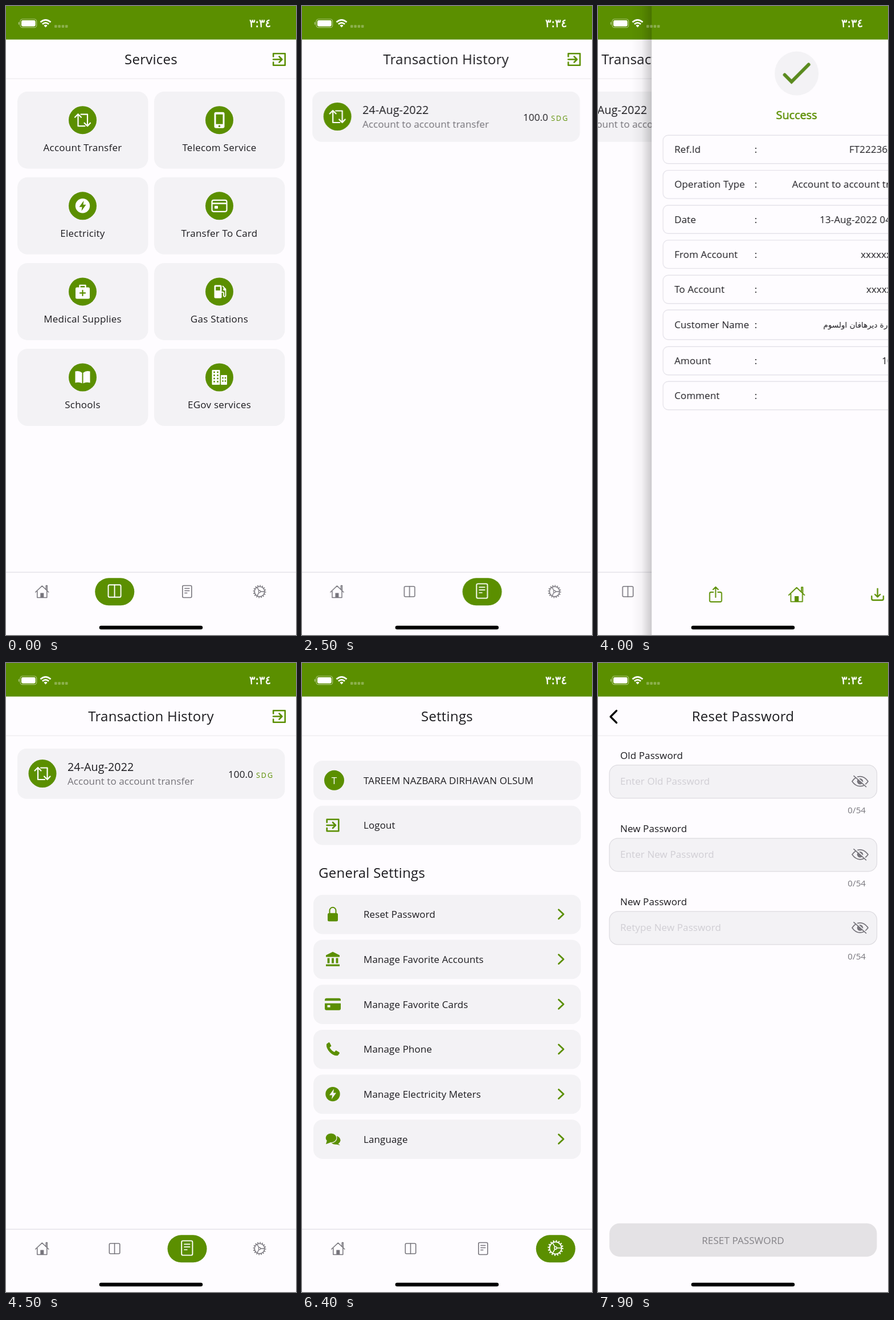
These frames come from a looping animation (509x1101 px, 8 s). An HTML page:

```html
<!DOCTYPE html>
<html lang="en">
<head>
<meta charset="utf-8">
<title>Mobile banking</title>
<style>
  html, body { margin: 0; width: 100%; height: 100%; overflow: hidden; background: #fefcff; }
  svg { display: block; width: 100%; height: 100%; }
  text { font-family: "Open Sans", "Noto Sans", "DejaVu Sans", sans-serif; font-size: 17px; letter-spacing: .1px; fill: #1c1b1f; }
  .title { font-size: 24px; letter-spacing: .26px; }
  .label { letter-spacing: .25px; }
  .date { font-size: 19.6px; letter-spacing: .12px; }
  .sub { fill: #747278; }
  .unit { font-size: 12.5px; letter-spacing: 2px; fill: #5b8f00; }
  .ok { font-size: 19.6px; fill: #5b8f00; stroke: #5b8f00; stroke-width: .6px; }
  .arabic { font-family: "DejaVu Sans", sans-serif; font-size: 13.5px; letter-spacing: 0; }
  .clock { font: 19.5px "DejaVu Sans", sans-serif; letter-spacing: 0; fill: #fff; stroke: #fff; stroke-width: .6px; }
  .hint { fill: #d0ced4; }
  .count { font-size: 15px; fill: #77757c; }
  .off { fill: #838186; }
  .white { color: #fff; fill: #fff; }
  .green { color: #5b8f00; }
  .gray { color: #77757c; }
  .line { fill: none; stroke: currentColor; stroke-linecap: round; stroke-linejoin: round; }

  #home, #history, #settings, #receipt, #reset { animation: 8s linear infinite; }
  #home { animation-name: home; }
  #history { animation-name: history; }
  #settings { animation-name: settings; }
  #receipt { animation-name: receipt; }
  #reset { animation-name: reset; }

  @keyframes history { 0%, 16.875% { opacity: 0; } 20%, 100% { opacity: 1; } }
  @keyframes settings { 0%, 70.625% { opacity: 0; } 76%, 100% { opacity: 1; } }
  @keyframes receipt {
    0%, 31.125% { transform: translateX(545px); animation-timing-function: cubic-bezier(.4, .3, .1, 1); }
    41%, 48.125% { transform: none; animation-timing-function: cubic-bezier(.5, .025, .1, 1); }
    55.875%, 100% { transform: translateX(545px); }
  }
  @keyframes reset {
    0%, 95.5% { transform: translateX(545px); animation-timing-function: cubic-bezier(.3, .6, .2, 1); }
    98.625%, 100% { transform: none; }
  }
  @keyframes home {
    0%, 31.125% { transform: none; animation-timing-function: cubic-bezier(.4, .3, .1, 1); }
    41%, 48.125% { transform: translateX(-167px); animation-timing-function: cubic-bezier(.5, .025, .1, 1); }
    55.875%, 95.5% { transform: none; animation-timing-function: cubic-bezier(.3, .6, .2, 1); }
    98.625%, 100% { transform: translateX(-167px); }
  }
</style>
</head>
<body>
<svg id="stage" viewBox="0 0 509 1101" preserveAspectRatio="none"></svg>
<script>
const GREEN = '#5b8f00', CARD = '#f3f2f5', EDGE = '#e5e3ea';

const text = (x, y, s, cls = '', anchor = 'start') =>
  `<text x="${x}" y="${y}" class="${cls}" text-anchor="${anchor}">${s}</text>`;
const rect = (x, y, w, h, r, fill, extra = '') =>
  `<rect x="${x}" y="${y}" width="${w}" height="${h}" rx="${r}" fill="${fill}" ${extra}/>`;
const circle = (x, y, r, fill = 'currentColor') => `<circle cx="${x}" cy="${y}" r="${r}" fill="${fill}"/>`;
const line = (d, w = 2) => `<path class="line" stroke-width="${w}" d="${d}"/>`;
const solid = (d, fill = 'currentColor') => `<path fill="${fill}" fill-rule="evenodd" d="${d}"/>`;
const at = (x, y, cls, body, scale = 1) =>
  `<g class="${cls}" transform="translate(${x} ${y}) scale(${scale})">${body}</g>`;
const cur = 'currentColor';
const bolt = 'M2-9L-6 2H-1L-2 9L6-2H1Z';

// Every icon is drawn around its own centre.
const icon = {
  swap: line('M-13.5-5L-8-10.5L-2.5-5M-8-10V10.5H4M-3-10H8.5V10.5M13.5 5L8.5 10.5L3 5', 2.2),
  phone: rect(-9, -14, 18, 28, 3, cur) + rect(-6, -10, 12, 17, 0, GREEN) + circle(0, 10.5, 1.7, GREEN),
  power: circle(0, 0, 12.7) + solid(bolt, GREEN),
  card: rect(-13, -10, 26, 20, 3, 'none', 'stroke="currentColor" stroke-width="2.2"') +
    rect(-13, -5.5, 26, 2.6, 0, cur) + rect(-8.5, 0, 6, 5, 1, cur),
  medical: rect(-12.5, -7.5, 25, 20, 2.5, cur) + line('M-5-8V-11H5V-8', 2.4) +
    `<g color="${GREEN}">${line('M0-2V7M-4.5 2.5H4.5', 2.2)}</g>`,
  gas: rect(-9, -11.5, 13, 23, 2, cur) + rect(-6.3, -8.5, 7.6, 6.5, 0, GREEN) +
    line('M4 1H6Q7.5 1 7.5 3V7.5Q9.5 10.5 11 7V-4L6-9.5', 1.8) + circle(9, -4, 2.4),
  book: solid('M-1-8Q-6-12.5-13-10.5V9.5Q-6 7.5-1 10.5ZM1-8Q6-12.5 13-10.5V9.5Q6 7.5 1 10.5Z'),
  city: rect(-13, -13, 14, 26, 1, cur) + rect(2.5, -4, 11, 17, 1, cur) +
    [-9, -3].map(x => [-9, -3.5, 2, 7.5].map(y => rect(x - 1.3, y - 1.3, 2.6, 2.6, 0, GREEN)).join('')).join('') +
    [6, 10.5].map(x => [1, 6.5].map(y => rect(x - 1.2, y - 1.2, 2.4, 2.4, 0, GREEN)).join('')).join(''),
  exit: line('M-10.3-5V-10.3H10.3V10.3H-10.3V5', 2.6) + line('M-10.5 0H4.5M0-5L5 0L0 5', 2.6),
  house: line('M-11.5 1L0-10L11.5 1M-8.5-1V10.5H8.5V-1M7-4V-10.5H9V-2.5', 1.5) + rect(-3, 2.5, 6, 8, 0, cur),
  columns: rect(-9.2, -9, 18.4, 18, 2, 'none', 'stroke="currentColor" stroke-width="1.6"') + line('M0-9V9', 1.6),
  sheet: rect(-8, -10.5, 16, 21, 2, 'none', 'stroke="currentColor" stroke-width="1.6"') +
    line('M-4-5.5H4M-4-1.5H4M-4 2.5H0', 1.4),
  gear: '<circle r="10.4" fill="none" stroke="currentColor" stroke-width="2" stroke-dasharray="1.7 2.384"/>' +
    '<circle r="8.8" fill="none" stroke="currentColor" stroke-width="1.5"/>' +
    line('M1.8 0H8.5M-1-1.7L-4.3-7.4M-1 1.7L-4.3 7.4', 1.3) +
    '<circle r="1.8" fill="none" stroke="currentColor" stroke-width="1.2"/>',
  share: line('M-4-4H-8Q-10.5-4-10.5-1.5V10.5Q-10.5 13-8 13H8Q10.5 13 10.5 10.5V-1.5Q10.5-4 8-4H4M0 5V-13M-4.5-8.5L0-13L4.5-8.5', 1.9),
  save: line('M-10.3 3V7.5Q-10.3 10-7.8 10H7.8Q10.3 10 10.3 7.5V3M0-10V4M-4.5 0L0 4.5L4.5 0', 2.3),
  lock: rect(-9, -2, 18, 14.5, 2.5, cur) + line('M-5.5-2V-6.5A5.5 5.5 0 0 1 5.5-6.5V-2', 2),
  bank: solid('M0-13L12-7V-4H-12V-7Z') + [-7.5, 0, 7.5].map(x => rect(x - 1.9, -2, 3.8, 9, 0, cur)).join('') +
    rect(-12, 9, 24, 3.2, 0, cur),
  fullCard: rect(-14, -10.5, 28, 21, 3, cur) + rect(-14, -6, 28, 4.5, 0, CARD) + rect(-9.5, 1.5, 5, 4, 0, CARD),
  call: solid('M-11-9L-7-12L-5.5-11.5L-2.5-5.5L-5.5-3Q-3 2 3 5L5.5 2L11.5 5.5L12 7L9 11Q2 12.5-5 5.5Q-12-2-11-9Z'),
  meter: circle(0, 0, 12.7) + solid(bolt, CARD),
  chat: '<ellipse cx="4.5" cy="2" rx="9" ry="7.5" fill="currentColor"/>' + solid('M8 7L13 11L5 9Z') +
    `<ellipse cx="-3" cy="-2" rx="10" ry="8.5" fill="currentColor" stroke="${CARD}" stroke-width="1.2"/>` + solid('M-10 2L-12 9L-4 6Z'),
  eye: line('M-14 0Q-8-8.5 0-8.5T14 0Q8 8.5 0 8.5T-14 0Z', 1.7) + circle(0, 0, 5.3) +
    `<path d="M-9.5-10.5L11.5 8.5" stroke="${CARD}" stroke-width="2"/>` + line('M-11-9.5L10.5 9.5', 1.7),
};

const shell = rect(0, 0, 509, 1101, 0, '#fefcff') + rect(0, 0, 509, 58.7, 0, GREEN);
const header = title => shell + text(254.5, 102, title, 'title', 'middle') + rect(0, 126.7, 509, 1, 0, '#e8e6ec');
const exit = at(479.5, 93.5, 'green', icon.exit);
const badge = (x, y, name) => circle(x, y, 24.5, GREEN) + at(x, y, 'white', icon[name]);

function nav(active) {
  return rect(0, 990.5, 509, 1.3, 0, '#e2e0e6') + ['house', 'columns', 'sheet', 'gear'].map((name, i) => {
    const x = 63.3 + 127.25 * i;
    return i === active
      ? rect(x - 34.3, 1001.3, 69, 48, 24, GREEN) + at(x, 1024, 'white', icon[name], 1.2)
      : at(x, 1025, 'gray', icon[name]);
  }).join('');
}

const services = [
  ['swap', 'Account Transfer'], ['phone', 'Telecom Service'],
  ['power', 'Electricity'], ['card', 'Transfer To Card'],
  ['medical', 'Medical Supplies'], ['gas', 'Gas Stations'],
  ['book', 'Schools'], ['city', 'EGov services'],
];
const servicesScreen = header('Services') + exit + services.map(([name, label], i) => {
  const x = 20 + 240 * (i % 2), y = 149.7 + 150.1 * (i >> 1);
  return rect(x, y, 229.5, 135, 18, CARD) + badge(x + 114.5, y + 50, name) +
    text(x + 114.5, y + 104, label, 'label', 'middle');
}).join('') + nav(1);

const historyScreen = header('Transaction History') + exit +
  rect(20, 149.7, 469.5, 88, 16, CARD) + badge(64, 193.5, 'swap') +
  text(108, 188.5, '24-Aug-2022', 'date') + text(108, 213, 'Account to account transfer', 'sub') +
  text(390, 200.5, '100.0') + text(439, 200.5, 'SDG', 'unit') + nav(2);

const options = [
  ['lock', 'Reset Password'], ['bank', 'Manage Favorite Accounts'], ['fullCard', 'Manage Favorite Cards'],
  ['call', 'Manage Phone'], ['meter', 'Manage Electricity Meters'], ['chat', 'Language'],
];
const option = (y, label, mark) => rect(20, y, 469.5, 68.7, 16, CARD) + text(108, y + 40.5, label) + mark;
const settingsScreen = header('Settings') +
  option(171, 'TAREEM NAZBARA DIRHAVAN OLSUM',
    circle(56.5, 205.3, 17.5, GREEN) + text(56.5, 211.5, 'T', 'white', 'middle')) +
  option(249.8, 'Logout', at(54, 284, 'green', icon.exit)) +
  text(29, 376, 'General Settings', 'title') +
  options.map(([name, label], i) => {
    const y = 405.8 + 78.7 * i;
    return option(y, label, at(54, y + 34, 'green', icon[name]) +
      at(454.5, y + 34, 'green', line('M-4-8L4.5 0L-4 8', 2.8)));
  }).join('') + nav(3);

// label, value, centre, height
const rows = [
  ['Ref.Id', 'FT22236XHBVR', 251], ['Operation Type', 'Account to account transfer', 312.3],
  ['Date', '13-Aug-2022 04:46:11', 373.5], ['From Account', 'xxxxxxxx535', 434.7],
  ['To Account', 'xxxxxxxx06', 496], ['Customer Name', 'طريم نزبارة ديرهافان اولسوم', 558, 52],
  ['Amount', '100', 621], ['Comment', '', 682],
];
const receiptScreen = shell + circle(254.5, 118, 38.5, CARD) +
  '<path d="M233.5 120.5L245.5 132.5L275.5 102.5" fill="none" stroke="#5a8a1e" stroke-width="6" stroke-linecap="round"/>' +
  text(254.5, 198, 'Success', 'ok', 'middle') +
  rows.map(([label, value, y, h = 49.5]) => {
    const amount = label === 'Amount';
    return rect(20, y - h / 2, 469.5, h, 9, 'none', `stroke="${EDGE}" stroke-width="1.3"`) +
      text(40, y + 6, label) + text(180.5, y + 6, ':') +
      text(amount ? 433.5 : 468.5, y + (h > 50 ? 5 : 6), value, h > 50 ? 'arabic' : '', 'end') +
      (amount ? text(438, y + 6, 'SDG', 'unit') : '');
  }).join('') +
  at(112.3, 1030, 'green', icon.share) + at(254.5, 1030, 'green', icon.house, 1.2) + at(396.5, 1030, 'green', icon.save);

const fields = [['Old Password', 'Enter Old Password'], ['New Password', 'Enter New Password'], ['New Password', 'Retype New Password']];
const resetScreen = header('Reset Password') + line('M32.5 83.5L22 94L32.5 104.5', 3.2) +
  fields.map(([label, hint], i) => {
    const y = 178.7 + 128.1 * i;
    return text(39, y - 11.2, label) +
      rect(20, y, 469.5, 58, 15, CARD, 'stroke="#dddbe0" stroke-width="1.2"') +
      text(39, y + 34.5, hint, 'hint') + at(460, y + 28.5, 'gray', icon.eye) +
      text(470, y + 84.3, '0/54', 'count', 'end');
  }).join('') +
  rect(20, 980.7, 469.5, 58.5, 18, '#e4e2e5') + text(254.5, 1016.5, 'RESET PASSWORD', 'off', 'middle');

const dots = [0, 1, 2, 3].map(i => rect(85 + 6.3 * i, 33.3, 4.6, 4.6, 1, '#fff', 'opacity=".3"')).join('');
const statusBar = rect(25, 23, 28.7, 14.7, 4, 'none', 'stroke="#fff" stroke-opacity=".5" stroke-width="1.2"') +
  rect(27, 25, 24.7, 10.7, 2.4, '#fff') + rect(21.8, 28, 1.6, 4.8, .8, '#fff', 'opacity=".5"') +
  at(69.5, 36.5, 'white',
    '<g fill="none" stroke="#fff" stroke-width="2.8"><path d="M-9-8.2Q0-16 9-8.2"/><path d="M-5.6-4.7Q0-9.6 5.6-4.7"/></g>' +
    solid('M-3-2.3Q0-5 3-2.3L0 1Z')) +
  dots + text(446, 37, '٣:٣٤', 'clock', 'middle');

const page = (id, body) => `<g id="${id}">${rect(-36, 0, 36, 1101, 0, 'url(#shade)')}${body}</g>`;

document.getElementById('stage').innerHTML = `
  <defs><linearGradient id="shade">
    <stop offset="0" stop-opacity="0"/><stop offset=".5" stop-opacity=".04"/><stop offset="1" stop-opacity=".2"/>
  </linearGradient></defs>
  ${shell}
  <g id="home">${servicesScreen}<g id="history">${historyScreen}</g><g id="settings">${settingsScreen}</g></g>
  ${page('receipt', receiptScreen)}${page('reset', resetScreen)}
  ${statusBar}${rect(163.7, 1084.7, 181.5, 6.6, 3.3, '#000')}`;
</script>
</body>
</html>
```
